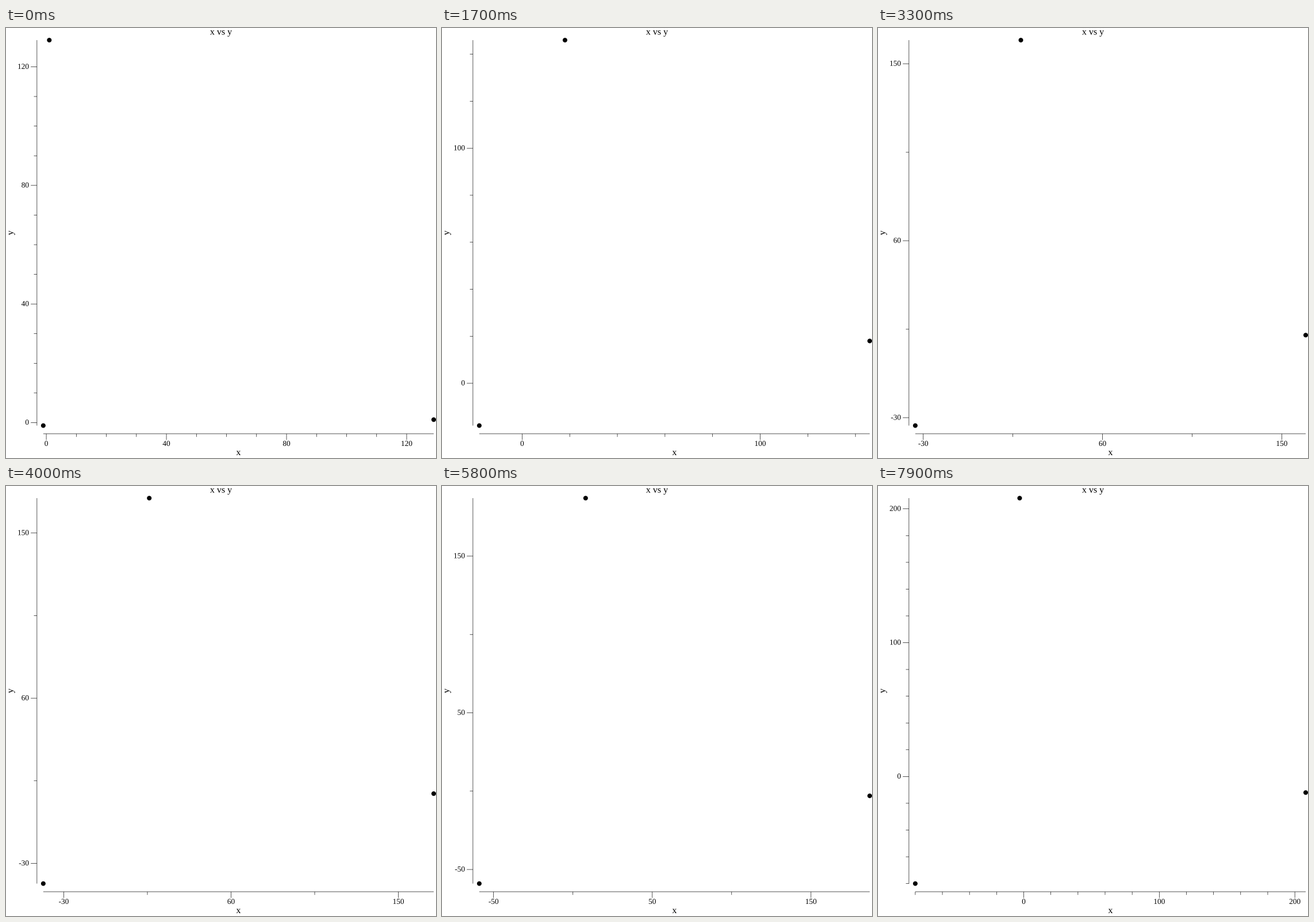
Write a matplotlib script that moves like this. It is 748 px wide and 748 px high and loops after 8000 ms.

```python
import math
from itertools import count

import matplotlib.pyplot as plt
import numpy as np
from matplotlib.animation import FuncAnimation
from matplotlib.collections import LineCollection, PathCollection
from matplotlib.path import Path
from matplotlib.textpath import TextPath
from matplotlib.transforms import Affine2D

SIZE, DPI = 748, 64
FRAMES, INTERVAL = 80, 100
TITLE, TICK = 16, 40 / 3          # font sizes in px
MAJOR, MINOR = 32 / 3, 16 / 3     # tick lengths
RADIUS = 4
BOTTOM, AXIS_Y, HEAD = 691.6, 705.9, 17.1
NICE = [1, 5, 2, 2.5, 4, 3]
WANT = 3
EM = {"-": 0.333, ".": 0.25, " ": 0.25, "s": 0.389}


# --- tick selection (extended Wilkinson labelling) ---

def score(simple, cover, dense):
    return 0.25 * simple + 0.2 * cover + 0.5 * dense + 0.05


def coverage(lo, hi, a, b):
    r = 0.1 * (hi - lo)
    return 1 - 0.5 * ((hi - b) ** 2 + (lo - a) ** 2) / r ** 2


def max_coverage(lo, hi, span):
    r = hi - lo
    return 1 if span <= r else 1 - (0.5 * (span - r) / (0.1 * r)) ** 2


def density(n, lo, hi, a, b):
    d = (n - 1) / (b - a) * (hi - lo) / (WANT - 1)
    return 2 - max(d, 1 / d)


def max_density(n):
    return 1 if n < WANT else 2 - (n - 1) / (WANT - 1)


def find_labels(lo, hi):
    """Return first label, label count, step digits, q and magnitude."""
    best, pick = -2, None
    for skip in count(1):
        for rank, q in enumerate(NICE):
            base = 1 - rank / (len(NICE) - 1) - skip
            if score(base + 1, 1, 1) < best:
                return pick
            for n in count(2):
                dm = max_density(n)
                if score(base + 1, 1, dm) < best:
                    break
                delta = (hi - lo) / (n + 1) / skip / q
                for mag in count(math.ceil(math.log10(delta))):
                    step = skip * q * 10.0 ** mag
                    span = step * (n - 1)
                    if score(base + 1, max_coverage(lo, hi, span), dm) < best:
                        break
                    first = (math.floor(hi / step) - (n - 1)) * skip
                    last = math.ceil(hi / step) * skip
                    for start in range(first, last + 1):
                        a = start * step / skip
                        b = a + span
                        if a < lo or b > hi:
                            continue
                        m = math.fmod(a, step)
                        zero = (m < 1e-13 or step - m < 1e-13) and a <= 0 <= b
                        s = score(base + zero, coverage(lo, hi, a, b),
                                  density(n, lo, hi, a, b))
                        if s > best:
                            best, pick = s, (a, n, skip * q, q, mag)


def ticks(lo, hi):
    """Return labelled ticks as (value, text) and the minor tick values."""
    a, n, digits, q, mag = find_labels(lo, hi)
    step = digits * 10.0 ** mag
    prec = max(0 if q == int(q) else 2, -mag)
    major = [(a + k * step, f"{a + k * step:.{prec}f}") for k in range(n)]
    if digits in (1, 2.5):
        gap = step / 5
    elif digits in (2, 3, 4, 5):
        gap = step / digits
    else:
        gap = step / 2
    ks = range(math.ceil((lo - a) / gap), math.floor((hi - a) / gap) + 1)
    minor = [a + k * gap for k in ks
             if all(abs(a + k * gap - v) >= gap / 2 for v, _ in major)]
    return major, minor


# --- drawing helpers ---

glyphs = {}


def width(s, size):
    return size * sum(EM.get(c, 0.5) for c in s)


def text_path(s, size):
    if (s, size) not in glyphs:
        glyphs[s, size] = TextPath((0, 0), s, size=size,
                                   prop={"family": "Liberation Serif"})
    return glyphs[s, size]


def text(s, size, x, y, align=0.5):
    shift = Affine2D().scale(1, -1).translate(x - align * width(s, size), y)
    return text_path(s, size).transformed(shift)


def upright(s, size, x, y):
    turn = Affine2D([[0, -1, x], [-1, 0, y + width(s, size) / 2], [0, 0, 1]])
    return text_path(s, size).transformed(turn)


def fit(start, room, boxes):
    """Axis length such that the furthest-reaching box ends at the edge."""
    at, half = max(boxes, key=lambda b: b[0] * room + b[1])
    return (room - start - half) / at


# --- motion: the corner points drift apart, then the inner ones sink back ---

KEYS = [0, 20, 33, 47, 58, 71, 79]
UPPER = [1, 21, 19, 13, 8, 2, -3]
RIGHT = [1, 21, 12, 4, -3, -9, -12]


def points(i):
    lo, hi = -1 - i, 129 + i
    return [(lo, lo), (round(np.interp(i, KEYS, UPPER)), hi),
            (hi, round(np.interp(i, KEYS, RIGHT)))]


fig = plt.figure(figsize=(SIZE / DPI, SIZE / DPI), dpi=DPI, facecolor="white")
ax = fig.add_axes([0, 0, 1, 1])
ax.set(xlim=(0, SIZE), ylim=(SIZE, 0))
ax.axis("off")

lines = LineCollection([], colors="black", linewidths=2 / 3 * 72 / DPI)
shapes = PathCollection([], facecolors="black", linewidths=0)
for art in (lines, shapes):
    art.set_snap(False)
    art.set_transform(ax.transData)
    ax.add_collection(art, autolim=False)


def draw(i):
    lo, hi = -1 - i, 129 + i
    major, minor = ticks(lo, hi)
    norm = lambda v: (v - lo) / (hi - lo)

    wide = max(width(s, TICK) for _, s in major)
    axis_x = 33.85 + wide
    left = axis_x + 11
    edge = left - RADIUS
    across = fit(RADIUS, SIZE - edge,
                 [(1, RADIUS)] + [(norm(v), width(s, TICK) / 2) for v, s in major])
    floor = BOTTOM + RADIUS
    up = fit(RADIUS, floor - HEAD,
             [(1, RADIUS)] + [(norm(v), 7.1) for v, _ in major])
    px = lambda v: left + norm(v) * across
    py = lambda v: BOTTOM - norm(v) * up

    segs = [[(left, AXIS_Y), (left + across, AXIS_Y)],
            [(axis_x, BOTTOM), (axis_x, BOTTOM - up)]]
    marks = [(v, MAJOR) for v, _ in major] + [(v, MINOR) for v in minor]
    for v, size in marks:
        segs.append([(px(v), AXIS_Y), (px(v), AXIS_Y + size)])
        segs.append([(axis_x - size, py(v)), (axis_x, py(v))])
    lines.set_segments(segs)

    paths = [text("x vs y", TITLE, SIZE / 2, 11.5),
             text("x", TITLE, left + across / 2, 743),
             upright("y", TITLE, 12.2, BOTTOM - up / 2)]
    for v, s in major:
        paths.append(text(s, TICK, px(v), 727))
        paths.append(text(s, TICK, 20 + wide, py(v) + 3.6, 1))
    paths += [Path.circle((px(x), py(y)), RADIUS) for x, y in points(i)]
    shapes.set_paths(paths)
    return lines, shapes


anim = FuncAnimation(fig, draw, frames=FRAMES, interval=INTERVAL,
                     repeat=True, repeat_delay=0)
plt.show()
```
